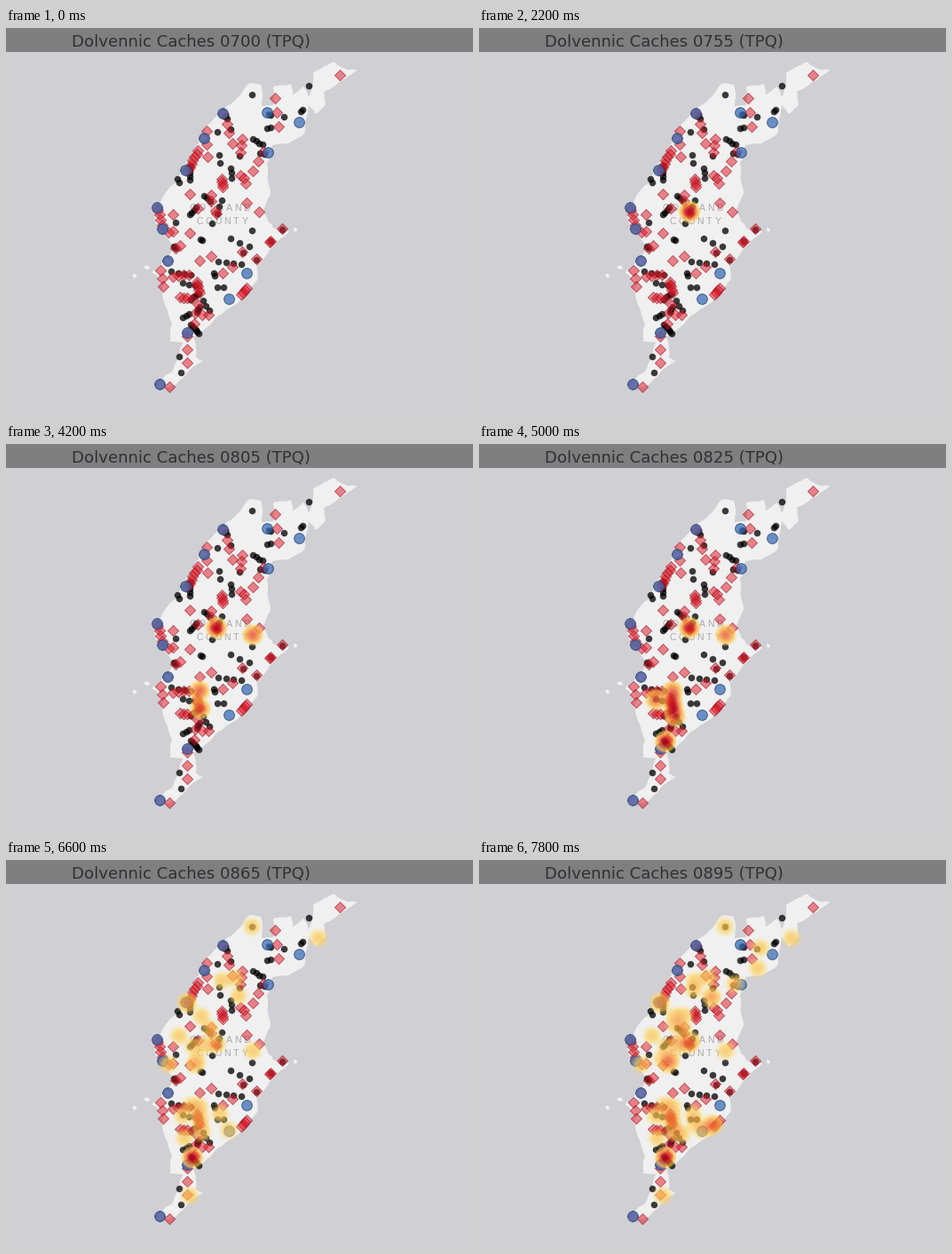
A matplotlib script for the animation above (8000 ms loop, 526x437 px).

```python
import numpy as np
import matplotlib.pyplot as plt
from matplotlib.animation import FuncAnimation
from matplotlib.colors import LinearSegmentedColormap
from matplotlib.patches import Polygon, Rectangle

W, H, DPI = 526, 437, 100
FRAMES, STEP_MS = 40, 200
FIRST_YEAR, YEARS_PER_STEP = 700, 5
RADIUS = 14

SEA, LAND, BAR, INK, LABEL = "#d0cfd4", "#f0f0f0", "#7f7f80", "#303032", "#aaaaac"

# Key points of the coast, clockwise from the north cape.
COAST = [
    (275, 62), (287, 64), (288, 88), (301, 87), (301, 66), (321, 63), (323, 75),
    (335, 66), (341, 78), (346, 50), (369, 38), (384, 47), (396, 47), (374, 62),
    (358, 72), (360, 86), (349, 97), (341, 87), (336, 119), (318, 130),
    (300, 132), (294, 152), (298, 187), (290, 206), (302, 226), (319, 229),
    (297, 250), (282, 268), (284, 282), (272, 300), (239, 324), (211, 348),
    (214, 371), (222, 375), (191, 402), (168, 405), (187, 387), (199, 354),
    (185, 353), (187, 334), (179, 312), (176, 290), (168, 276), (189, 246),
    (169, 220), (168, 204), (192, 174), (212, 136), (226, 110), (248, 88),
]
ISLETS = [(145, 279), (159, 270), (326, 227), (167, 275)]

# Finds lie singly (x, y) or in chains (x0, y0, x1, y1, count).
DIAMONDS = [
    (376, 53), (207, 187), (216, 203), (188, 210), (207, 231), (311, 226),
    (217, 312), (212, 333), (184, 404),
]
DIAMOND_CHAINS = [
    (303, 79, 307, 111, 3), (245, 97, 255, 130, 4), (266, 125, 264, 140, 3),
    (226, 116, 227, 145, 3), (216, 138, 205, 160, 7), (290, 139, 278, 161, 3),
    (264, 165, 270, 175, 3), (243, 170, 244, 179, 4), (230, 189, 231, 194, 2),
    (271, 197, 285, 206, 2), (236, 206, 237, 210, 2), (171, 205, 176, 222, 4),
    (183, 230, 188, 230, 2), (191, 248, 196, 245, 2), (174, 273, 177, 292, 3),
    (188, 280, 206, 278, 4), (218, 262, 231, 257, 2), (266, 252, 282, 260, 2),
    (297, 241, 298, 240, 2), (244, 276, 255, 269, 2), (272, 293, 265, 300, 4),
    (214, 286, 218, 298, 5), (196, 303, 209, 305, 4), (213, 321, 228, 323, 3),
    (204, 347, 204, 377, 3),
]
DOTS = [
    (277, 75), (341, 65), (313, 100), (263, 144), (191, 219), (232, 220),
    (277, 228), (298, 240), (311, 227), (282, 261), (267, 253),
]
DOT_CHAINS = [
    (331, 94, 334, 92, 2), (295, 97, 298, 98, 2), (298, 112, 294, 113, 2),
    (247, 99, 249, 102, 2), (238, 117, 254, 114, 2), (278, 125, 289, 131, 4),
    (286, 140, 291, 142, 2), (240, 143, 240, 152, 2), (253, 158, 254, 169, 3),
    (208, 155, 206, 171, 5), (193, 170, 195, 174, 2), (223, 189, 229, 194, 3),
    (243, 194, 237, 209, 3), (214, 202, 207, 210, 4), (253, 237, 274, 246, 3),
    (218, 238, 221, 240, 2), (188, 246, 191, 248, 2), (239, 262, 265, 266, 4),
    (234, 275, 235, 279, 2), (187, 274, 208, 278, 4), (199, 287, 212, 290, 3),
    (238, 292, 244, 292, 2), (217, 299, 208, 306, 4), (222, 307, 228, 318, 3),
    (218, 314, 215, 321, 3), (199, 326, 206, 322, 3), (209, 334, 217, 344, 6),
    (195, 370, 197, 388, 2),
]
CIRCLES = [
    (244, 96), (294, 95), (330, 106), (223, 124), (295, 140), (202, 160),
    (170, 202), (176, 226), (182, 262), (271, 276), (251, 305), (204, 343),
    (173, 401),
]

# Hoards of a wave enter the heat map one by one from its first to its last year.
WAVES = [
    (785, 825, [(219, 298), (278, 215), (218, 278), (199, 288), (218, 289),
                (221, 307)]),
    (830, 850, [(243, 136), (213, 231), (241, 286), (220, 176), (211, 210),
                (183, 230), (201, 313), (224, 209)]),
    (855, 875, [(277, 75), (262, 153), (205, 162), (195, 198), (230, 190),
                (215, 226), (209, 276), (251, 304), (207, 378), (352, 88),
                (258, 133), (203, 160), (221, 186), (240, 203), (206, 224),
                (265, 298), (260, 301), (229, 309), (317, 99), (262, 156),
                (242, 146), (213, 290), (243, 296), (314, 122)]),
    (880, 890, [(288, 139), (262, 297), (229, 205), (231, 175), (216, 225)]),
]
FIRST_HOARD, FIRST_HOARD_YEAR = (237, 207), 715
HUB = (210, 335)

HEAT_MAP = LinearSegmentedColormap.from_list("heat", [
    (0.00, (1.00, 0.88, 0.45, 0.0)),
    (0.13, (1.00, 0.82, 0.33, 0.65)),
    (0.35, (0.98, 0.62, 0.22, 0.74)),
    (0.65, (0.92, 0.30, 0.15, 0.78)),
    (1.00, (0.72, 0.02, 0.13, 0.82)),
])


def px(n):
    return n * 72 / DPI


def roughen(points, rounds=3, shake=0.07):
    """Halve every edge a few times, shifting midpoints into a ragged coast."""
    a = np.array(points, float)
    for _ in range(rounds):
        b = np.roll(a, -1, axis=0)
        reach = np.linalg.norm(b - a, axis=1, keepdims=True)
        mid = (a + b) / 2 + rng.uniform(-shake, shake, a.shape) * reach
        a = np.stack([a, mid], axis=1).reshape(-1, 2)
    return a


def islet(x, y):
    angle = np.linspace(0, 2 * np.pi, 9)[:-1]
    r = rng.uniform(1.5, 3.5, 8)
    return np.column_stack([x + r * np.cos(angle), y + r * np.sin(angle)])


def spread(singles, chains):
    """All finds: the single ones, then each chain evenly with a slight jitter."""
    parts = [np.array(singles, float)]
    for x0, y0, x1, y1, n in chains:
        line = np.linspace((x0, y0), (x1, y1), n)
        parts.append(line + rng.uniform(-0.6, 0.6, line.shape))
    return np.vstack(parts)


def kernel(x, y):
    d2 = ((GX - x) ** 2 + (GY - y) ** 2) / RADIUS ** 2
    return np.clip(1 - d2, 0, None) ** 2


def scatter(points, marker, size, face, edge, width, z):
    x, y = np.array(points).T
    ax.scatter(x, y, s=px(size) ** 2, marker=marker, facecolors=[face],
               edgecolors=[edge], linewidths=px(width), zorder=z)


def spaced(word, x, y, step):
    for i, letter in enumerate(word):
        ax.text(x + i * step, y, letter, family="Liberation Sans", size=px(10.5),
                color=LABEL, ha="center", va="baseline", zorder=2)


rng = np.random.default_rng(4)
GX, GY = np.meshgrid(np.arange(W) + 0.5, np.arange(H) + 0.5)

layers = [(FIRST_HOARD_YEAR, 2 * kernel(*FIRST_HOARD))]
for first, last, hoards in WAVES:
    for year, spot in zip(np.linspace(first, last, len(hoards)), hoards):
        layers.append((year, 1.3 * kernel(*spot)))
hub = kernel(*HUB)

fig = plt.figure(figsize=(W / DPI, H / DPI), dpi=DPI, facecolor=SEA)
ax = fig.add_axes([0, 0, 1, 1])
ax.axis("off")

for shape in [roughen(COAST)] + [islet(x, y) for x, y in ISLETS]:
    ax.add_patch(Polygon(shape, fc=LAND, lw=0, zorder=1))
spaced("GOTLAND", 211, 206, 10)
spaced("COUNTY", 218, 221, 10.3)

# Circles on the west side each cover one more diamond.
covered = [(x, y) for x, y in CIRCLES if x < 250]
scatter(spread(DOTS, DOT_CHAINS), "o", 7.3, (0, 0, 0, 0.76), (0, 0, 0, 0.25), 0.6, 3)
scatter(spread(DIAMONDS + covered, DIAMOND_CHAINS), "D", 8.7,
        (0.88, 0.08, 0.14, 0.5), (0.6, 0.05, 0.1, 0.6), 0.9, 4)
scatter(CIRCLES, "o", 11.7, (0.23, 0.43, 0.71, 0.75), (0.12, 0.25, 0.45, 0.75), 1, 5)

heat = ax.imshow(np.zeros((H, W, 4)), extent=(0, W, H, 0), aspect="auto",
                 interpolation="nearest", zorder=6)
ax.add_patch(Rectangle((0, 0), W, 27, fc=BAR, lw=0, zorder=7))
title = ax.text(73.5, 21.3, "", family="DejaVu Sans", size=px(18.2), color=INK,
                va="baseline", zorder=8)
ax.set_xlim(0, W)
ax.set_ylim(H, 0)


def draw(i):
    year = FIRST_YEAR + YEARS_PER_STEP * i
    title.set_text(f"Dolvennic Caches {year:04d} (TPQ)")
    density = np.zeros((H, W))
    for start, layer in layers:
        if start <= year:
            density += layer
    density += hub * np.interp(year, [815, 820, 825, 850], [0, 2.2, 2.2, 6.6])
    heat.set_data(HEAT_MAP(density / max(density.max(), 1e-9)))
    return title, heat


anim = FuncAnimation(fig, draw, frames=FRAMES, interval=STEP_MS, repeat=True,
                     repeat_delay=0)
plt.show()
```
